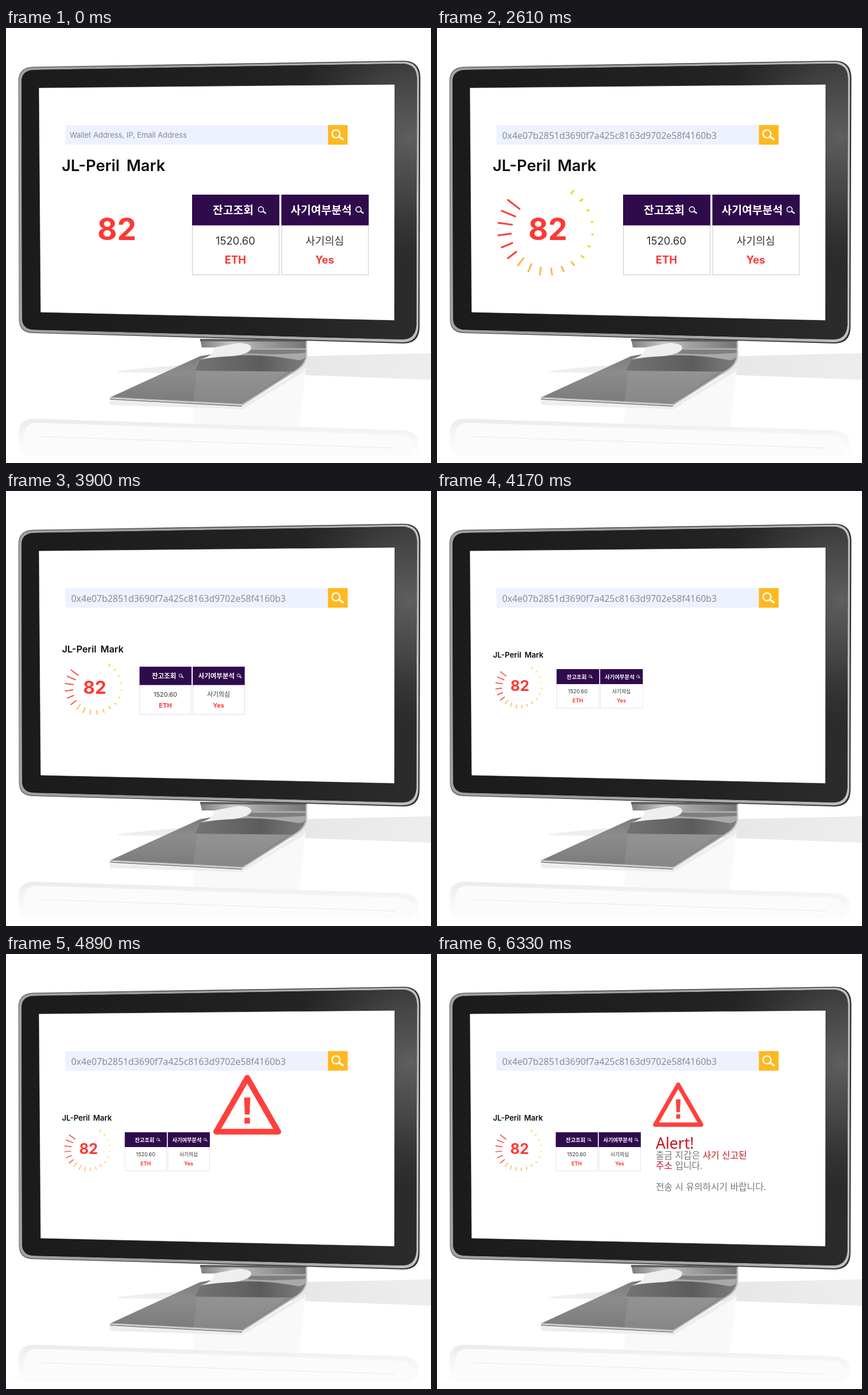
An HTML page for the animation above (8 s loop, 740x757 px).

```html
<!DOCTYPE html>
<html lang="ko">
<head>
<meta charset="utf-8">
<title>Wallet risk check</title>
<style>
  html, body { margin: 0; width: 100%; height: 100%; overflow: hidden; background: #fff; }
  svg { display: block; width: 100%; height: 100%; }
  text { font-family: Inter, "Noto Sans CJK KR", "Noto Sans CJK", sans-serif; white-space: pre; }
  .mid { text-anchor: middle; }
  .red { fill: #ff3833; font-weight: 700; }
  .head { font: 700 19.3px "Noto Sans CJK KR", "Noto Sans CJK", sans-serif; fill: #fff; }
  .note { font: 300 15.8px "Noto Sans CJK KR", "Noto Sans CJK", sans-serif; fill: #777; }
  .warn { fill: #c4161c; }
</style>
</head>
<body>
<svg viewBox="0 0 740 757">
  <defs>
    <linearGradient id="edge" x1="0" y1="0" x2="1" y2="0">
      <stop offset="0" stop-color="#6c6c6c"/><stop offset=".5" stop-color="#4a4a4a"/>
      <stop offset="1" stop-color="#303030"/>
    </linearGradient>
    <linearGradient id="rim" x1="0" y1="0" x2="1" y2="0">
      <stop offset="0" stop-color="#a2a2a2"/><stop offset=".3" stop-color="#9b9b9b"/>
      <stop offset=".8" stop-color="#b0b0b0"/><stop offset="1" stop-color="#c0c0c0"/>
    </linearGradient>
    <linearGradient id="bezel" x1="0" y1="0" x2="1" y2="0">
      <stop offset="0" stop-color="#1b1b1b"/><stop offset=".6" stop-color="#212121"/>
      <stop offset="1" stop-color="#2c2c2c"/>
    </linearGradient>
    <radialGradient id="glare" gradientUnits="userSpaceOnUse" cx="704" cy="190" r="215">
      <stop offset="0" stop-color="#707070" stop-opacity=".75"/>
      <stop offset=".45" stop-color="#606060" stop-opacity=".5"/>
      <stop offset="1" stop-color="#444" stop-opacity="0"/>
    </radialGradient>
    <linearGradient id="base" gradientUnits="userSpaceOnUse" x1="0" y1="570" x2="0" y2="655">
      <stop offset="0" stop-color="#7c7c7c"/><stop offset=".35" stop-color="#8c8c8c"/>
      <stop offset="1" stop-color="#7a7a7a"/>
    </linearGradient>
    <linearGradient id="fold" x1="0" y1="0" x2="1" y2="0">
      <stop offset="0" stop-color="#747474"/><stop offset=".6" stop-color="#5c5c5c"/>
      <stop offset="1" stop-color="#7c7c7c"/>
    </linearGradient>
    <linearGradient id="neck" x1="0" y1="0" x2="1" y2="0">
      <stop offset="0" stop-color="#7c7c7c"/><stop offset=".3" stop-color="#c8c8c8"/>
      <stop offset=".55" stop-color="#a2a2a2"/><stop offset="1" stop-color="#747474"/>
    </linearGradient>
    <linearGradient id="shadow" x1="0" y1="0" x2="1" y2="0">
      <stop offset="0" stop-color="#f0f0f0"/><stop offset=".5" stop-color="#e6e6e6"/>
      <stop offset="1" stop-color="#ededed"/>
    </linearGradient>
    <linearGradient id="mirror" x1="0" y1="0" x2="0" y2="1">
      <stop offset="0" stop-color="#eaeaea"/><stop offset=".35" stop-color="#f4f4f4"/>
      <stop offset="1" stop-color="#fff"/>
    </linearGradient>
    <g id="lens" fill="none" stroke="#fff" stroke-linecap="round">
      <circle cx="-2.5" cy="-2" r="6.9" stroke-width="2.3"/>
      <path d="M3.2 3.2L9.500 7.600" stroke-width="3.500"/>
    </g>
    <g id="button">
      <rect x="560.700" y="169" width="34" height="34" fill="#ffb81f"/>
      <use href="#lens" x="577" y="186.200"/>
    </g>
  </defs>

  <rect width="740" height="757" fill="#fff"/>

  <!-- floor -->
  <path d="M195 597Q270 588 360 583L520 571L740 566V612L520 604L195 599Z" fill="url(#shadow)"/>
  <path d="M327 658L420 657L522 592L510 695L326 688Z" fill="#f9f9f9"/>
  <path d="M22 745V702Q23 681 48 680L690 700Q719 702 719 724V745Z" fill="url(#mirror)"/>
  <path d="M32 745V708Q33 688 52 687L684 708Q709 710 709 730V745Z" fill="#fbfbfb"/>
  <path d="M58 711L678 731" stroke="#f1f1f1" stroke-width="2"/>

  <!-- stand -->
  <path d="M180 648L411 658L520 591V598L412 663L182 656Z" fill="#ededed"/>
  <path d="M181 643L338 571L425 556H523V570Q522 584 508 594L411 655Z" fill="url(#base)"/>
  <path d="M336 575L328 598H490L411 655L326 650Z" fill="#a4a4a4" opacity=".3"/>
  <path d="M338 577Q370 570 425 567L520 575Q517 588 503 598L329 596Z" fill="url(#fold)"/>
  <path d="M427 556H523V567Q521 578 509 578Q440 566 395 571Q424 567 427 556Z" fill="#a9a9a9"/>
  <path d="M427 560H523V565Q470 570 420 566Z" fill="#7f7f7f"/>
  <path d="M362 555L405 547Q432 546 427 557Q424 567 395 571Q365 572 338 577Q364 569 362 555Z" fill="#efefef"/>
  <path d="M338 541L524 543V557H427Q428 549 405 548L362 556H341Z" fill="url(#neck)"/>
  <path d="M338 541L524 543V546L338 545Z" fill="#606060"/>
  <path d="M523 545V570Q522 584 508 594L411 656" fill="none" stroke="#bdbdbd" stroke-width="2.500"/>
  <path d="M181 643.500L411 655.500" stroke="#c6c6c6" stroke-width="2.500"/>
  <path d="M181 646L411 658" stroke="#707070" stroke-width="1.500"/>

  <!-- monitor -->
  <path d="M21.500 92Q22 69 46 67.500L692 57Q721 57 721.500 86L720 520Q720 549 692 549L46 531Q23 530 22.500 508Z" fill="url(#edge)"/>
  <path d="M22.500 93Q23 70 47 69L692 58.500Q718 59 719 86L718 519Q717 546 692 547L47 529.500Q24 528 23.500 508Z" fill="url(#rim)"/>
  <g id="frame">
    <path id="face" d="M27 94Q27 74 48 73L690 62Q715 63 715.500 87L714.500 517Q713 542 690 542L48 525Q29 524 28 506Z" fill="url(#bezel)"/>
    <use href="#face"/>
    <path d="M27 94Q27 74 48 73L690 62Q715 63 715.500 87L714.500 517Q713 542 690 542L48 525Q29 524 28 506Z" fill="url(#glare)"/>
  </g>
  <path d="M57 104L677 98L676.500 509L60 495Z" fill="#fff" stroke="#101010" stroke-width=".6"/>

  <!-- search bar -->
  <rect x="103.500" y="169" width="458" height="34" fill="#eef2ff"/>
  <text id="hint" x="111" y="191" font-size="12.9" fill="#85878f">Wallet Address, IP, Email Address</text>
  <text id="address" x="113.500" y="193" fill="#8b8c92" style="font:15.85px 'Noto Sans',sans-serif">0x4e07b2851d3690f7a425c8163d9702e58f4160b3</text>
  <use href="#button"/>
  <use id="press" href="#button"/>

  <!-- score panel -->
  <g id="panel">
    <text x="97" y="249" font-size="27.3" font-weight="600" word-spacing="5" fill="#0d0d12">JL-Peril Mark</text>
    <text class="mid red" x="193" y="369" font-size="53">82</text>
    <g id="gauge"></g>
    <g id="cards"></g>
  </g>

  <!-- alert -->
  <g id="sign">
    <path d="M420 227.500L380 297H460Z" fill="none" stroke="#ff403c" stroke-width="7.500" stroke-linejoin="round"/>
    <path d="M416 253H424L423 275H417ZM416.500 279H423.500V286.500H416.500Z" fill="#ff403c"/>
  </g>
  <g id="message">
    <text class="warn" x="381" y="339" style="font:26.5px 'Noto Sans',sans-serif">Alert!</text>
    <text class="note" x="381" y="355.500">출금 지갑은 <tspan class="warn">사기 신고된</tspan></text>
    <text class="note" x="381" y="374"><tspan class="warn">주소</tspan> 입니다.</text>
    <text class="note" x="381" y="411">전송 시 유의하시기 바랍니다.</text>
  </g>
</svg>
<script>
const LOOP = 8000, STEP = 30;
const el = id => document.getElementById(id);
const clamp = v => Math.max(0, Math.min(1, v));
const ramp = (t, first, last) => clamp((t - first + STEP) / (last - first + STEP));
const smooth = u => (1 - Math.cos(Math.PI * clamp(u))) / 2;
const zoom = (x, y, s) => `translate(${x} ${y}) scale(${s}) translate(${-x} ${-y})`;
const fade = (id, v) => el(id).setAttribute('opacity', v);

function tick(k) {
  const color = k < 7 ? '#dbe20c' : k < 13 ? '#ffb252' : '#ff3b3b';
  const length = k < 4 ? 9 - 1.6 * k : Math.min(28, 3.5 + 1.9 * (k - 4));
  const outer = k > 6 && k < 13 ? 81 : 84;
  return `<path transform="translate(189 350) rotate(${15.1 * k - 54})"
    d="M${outer - length} 0H${outer}" stroke="${color}" stroke-width="3"/>`;
}

function card(x, title, titleX, lensX, value, size, result) {
  const c = x + 75.5;
  return `<rect x="${x + .5}" y="290.5" width="151" height="139" fill="#fff" stroke="#c9c8d8"/>
    <rect x="${x}" y="290" width="152" height="53.5" fill="#2f0b4c"/>
    <text class="head" x="${titleX}" y="324">${title}</text>
    <use href="#lens" transform="translate(${lensX} 317) scale(.66)"/>
    <text class="mid" x="${c}" y="377" font-size="${size}" fill="#333">${value}</text>
    <text class="mid red" x="${c}" y="410" font-size="18.5">${result}</text>`;
}

el('gauge').innerHTML = Array.from({ length: 19 }, (_, k) => tick(k)).join('');
el('cards').innerHTML =
  card(324, '잔고조회', 360, 445.5, '1520.60', 18.5, 'ETH') +
  card(479.5, '사기여부분석', 495.5, 615.5, '사기의심', 18.2, 'Yes');

// Grows past full size, then settles.
function pop(id, x, y, u) {
  const peak = 1.39, turn = .6;
  const s = u < turn ? peak * smooth(u / turn) : peak - (peak - 1) * smooth((u - turn) / (1 - turn));
  el(id).setAttribute('transform', zoom(x, y, s));
  fade(id, clamp(u / .25));
}

function draw(t) {
  const typed = ramp(t, 30, 600);
  fade('hint', 1 - typed);
  fade('address', typed);
  pop('press', 577.5, 186, ramp(t, 1260, 1800));
  fade('gauge', ramp(t, 2070, 2610));

  // Critically damped shrink of the panel.
  const w = t < 3720 ? 0 : (t - 3681) * .0131;
  el('panel').setAttribute('transform', zoom(98, 329, .4815 + .5185 * (1 + w) * Math.exp(-w)));

  pop('sign', 420, 262, ramp(t, 4530, 5070));
  fade('message', ramp(t, 5790, 6330));
}

const start = performance.now();
function loop() {
  const t = (performance.now() - start) % LOOP;
  draw(Math.floor(t / STEP) * STEP);
  requestAnimationFrame(loop);
}
draw(0);
requestAnimationFrame(loop);
</script>
</body>
</html>
```
